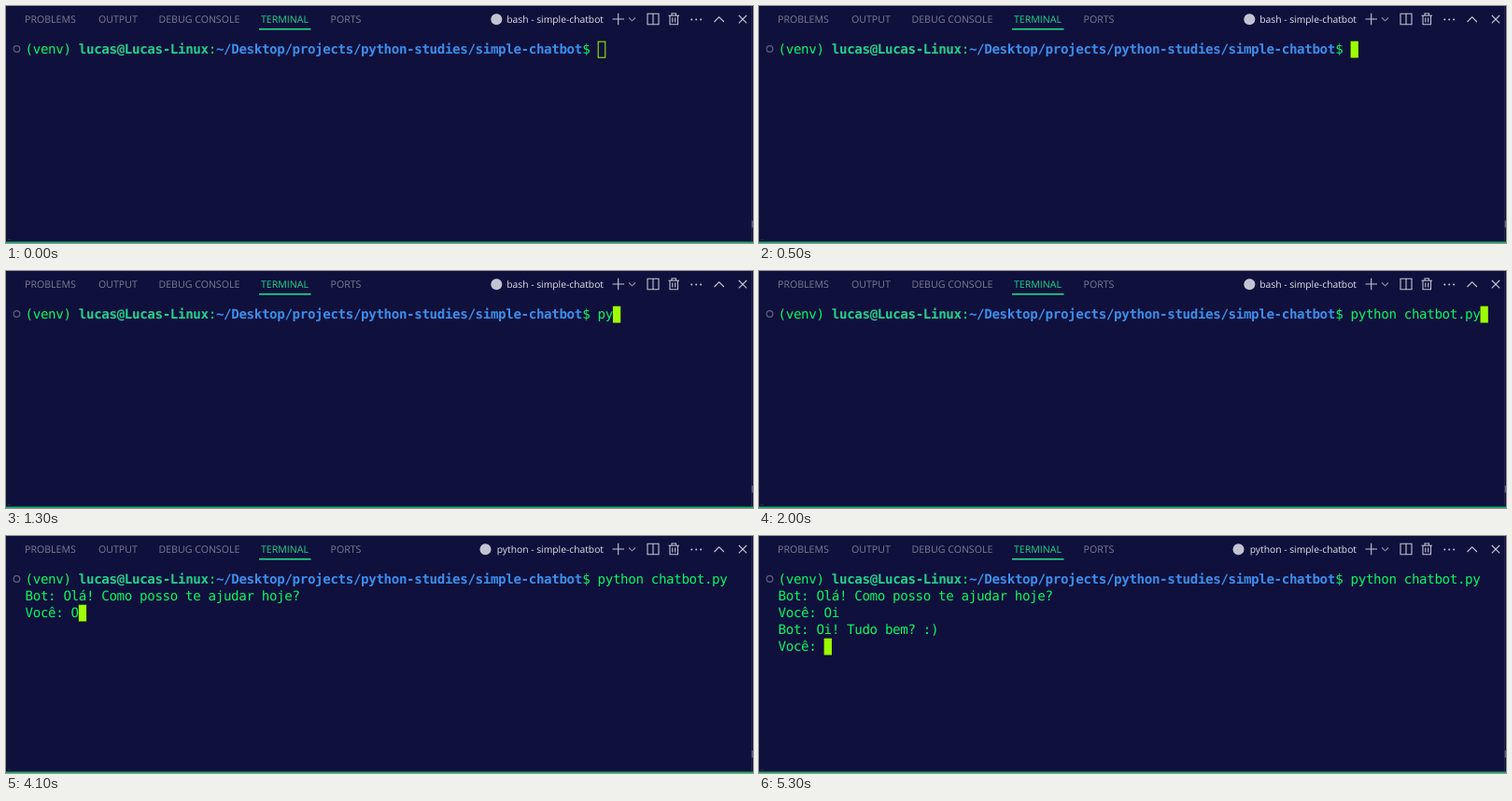
An HTML page that plays this animation: 800x254 px, repeating every 8000 ms.

```html
<!DOCTYPE html>
<html lang="en">
<head>
<meta charset="utf-8">
<title>Terminal session</title>
<style>
  html, body { margin: 0; width: 100%; height: 100%; overflow: hidden; background: #10103c; }
  svg { display: block; width: 800px; height: 254px; }
  text { white-space: pre; text-rendering: geometricPrecision; }
  .ui { font: 10.6px "Open Sans", sans-serif; fill: #7c7c94; }
  .ui .active { fill: #1fd98a; }
  .ui .shell { font-size: 10.3px; fill: #e2e2ec; text-anchor: end; }
  .icons { fill: none; stroke: #c3c3d2; stroke-width: 1.1; }
  .term { font: 14.2px "DejaVu Sans Mono", monospace; letter-spacing: -.375px; fill: #08f862; }
  .term .bold { font-weight: bold; }
  .term .user { fill: #23d18b; }
  .term .path { fill: #3b8eea; }
</style>
</head>
<body>
<svg viewBox="0 0 800 254">
  <rect width="800" height="254" fill="#10103c"/>
  <path d="M798.5 0V252" stroke="#26264c"/>
  <rect y="252.5" width="800" height="1.5" fill="#0fae62"/>
  <path d="M2 250.5h4" stroke="#34345c" stroke-dasharray="1"/>
  <rect x="798.6" y="230" width="1.4" height="7.5" fill="#5c5c78"/>

  <g class="ui">
    <text x="20" y="18">PROBLEMS</text>
    <text x="99" y="18">OUTPUT</text>
    <text x="163.5" y="18">DEBUG CONSOLE</text>
    <text x="273" y="18" class="active">TERMINAL</text>
    <text x="347.5" y="18">PORTS</text>
    <text x="640" y="18" class="shell" id="shell"></text>
    <rect x="271" y="24" width="55.5" height="1.6" class="active"/>
  </g>

  <circle id="badge" cy="14.3" r="6" fill="#c3c3d2"/>
  <g class="icons">
    <path d="M649.5 14h12.5M655.7 7.8v12.4"/>
    <path d="M667 12.5l3.5 3.3 3.5-3.3" stroke="#8c8ca2"/>
    <path d="M687 8.3h12v11.4h-12zM693 8.3v11.4"/>
    <path d="M709.5 10.3h11.5M713 10v-2h4.5v2M711 10.5v9.3h8.5v-9.3M713.8 12.5v5M716.7 12.5v5"/>
    <path d="M758.5 17l5.2-5.2 5.2 5.2M784.8 10l8.4 8.4M793.2 10l-8.4 8.4"/>
    <g fill="#c3c3d2" stroke="none">
      <circle cx="734.3" cy="14.5" r="1"/>
      <circle cx="739.2" cy="14.5" r="1"/>
      <circle cx="744.1" cy="14.5" r="1"/>
    </g>
  </g>

  <circle cx="11.5" cy="46" r="3.3" fill="none" stroke="#60607e" stroke-width="1.2"/>
  <rect id="cursor"/>
  <g class="term" id="term"></g>
</svg>
<script>
  const LOOP = 8000, LEFT = 20.6, CELL = 8.173, TOP = 37.7, ROW = 18;
  const PROMPT = [
    ["(venv) ", ""],
    ["lucas@Lucas-Linux", "bold user"],
    [":", ""],
    ["~/Desktop/projects/python-studies/simple-chatbot", "bold path"],
    ["$ ", ""]
  ];
  const PROMPT_LEN = PROMPT.reduce((n, [s]) => n + s.length, 0);

  const RUN = "python chatbot.py";
  const HELLO = "Bot: Olá! Como posso te ajudar hoje?";
  const REPLY = "Bot: Oi! Tudo bem? :)";
  const YOU = "Você: ";

  // [start ms, shell name, focused, rows]; the first row follows the prompt
  const STEPS = [
    [0, "bash", false, [""]],
    [500, "bash", true, [""]],
    [1300, "bash", true, ["py"]],
    [2000, "bash", true, [RUN]],
    [2900, "bash", true, [RUN, HELLO, YOU]],
    [3000, "python", true, [RUN, HELLO, YOU]],
    [4100, "python", true, [RUN, HELLO, YOU + "O"]],
    [4400, "python", true, [RUN, HELLO, YOU + "Oi"]],
    [5300, "python", true, [RUN, HELLO, YOU + "Oi", REPLY, YOU]]
  ];

  const $ = id => document.getElementById(id);
  const set = (el, attrs) => {
    for (const k in attrs) el.setAttribute(k, attrs[k]);
    return el;
  };
  const write = (row, col, cls = "", str = "") => {
    const el = document.createElementNS("http://www.w3.org/2000/svg", "text");
    set(el, { x: LEFT + col * CELL, y: TOP + 13.7 + row * ROW, class: cls });
    el.textContent = str;
    return $("term").appendChild(el);
  };

  let col = 0;
  for (const [str, cls] of PROMPT) {
    write(0, col, cls, str);
    col += str.length;
  }
  const rows = [0, 1, 2, 3, 4].map(r => write(r, r ? 0 : PROMPT_LEN));

  function show([, shell, focused, lines]) {
    $("shell").textContent = shell + " - simple-chatbot";
    set($("badge"), { cx: shell === "bash" ? 525.3 : 513.5 });
    rows.forEach((el, r) => { el.textContent = lines[r] || ""; });

    const last = lines.length - 1;
    const x = LEFT + (lines[last].length + (last ? 0 : PROMPT_LEN)) * CELL;
    const y = TOP + last * ROW;
    set($("cursor"), focused
      ? { x, y, width: 8.3, height: 17.8, fill: "#9dff00", stroke: "none" }
      : { x: x + .6, y: y + .5, width: 7.6, height: 17, fill: "none", stroke: "#9dff00" });
  }

  let shown;
  function tick() {
    const t = performance.now() % LOOP;
    const step = STEPS.findLast(s => s[0] <= t);
    if (step !== shown) show(shown = step);
    requestAnimationFrame(tick);
  }
  tick();
</script>
</body>
</html>
```
